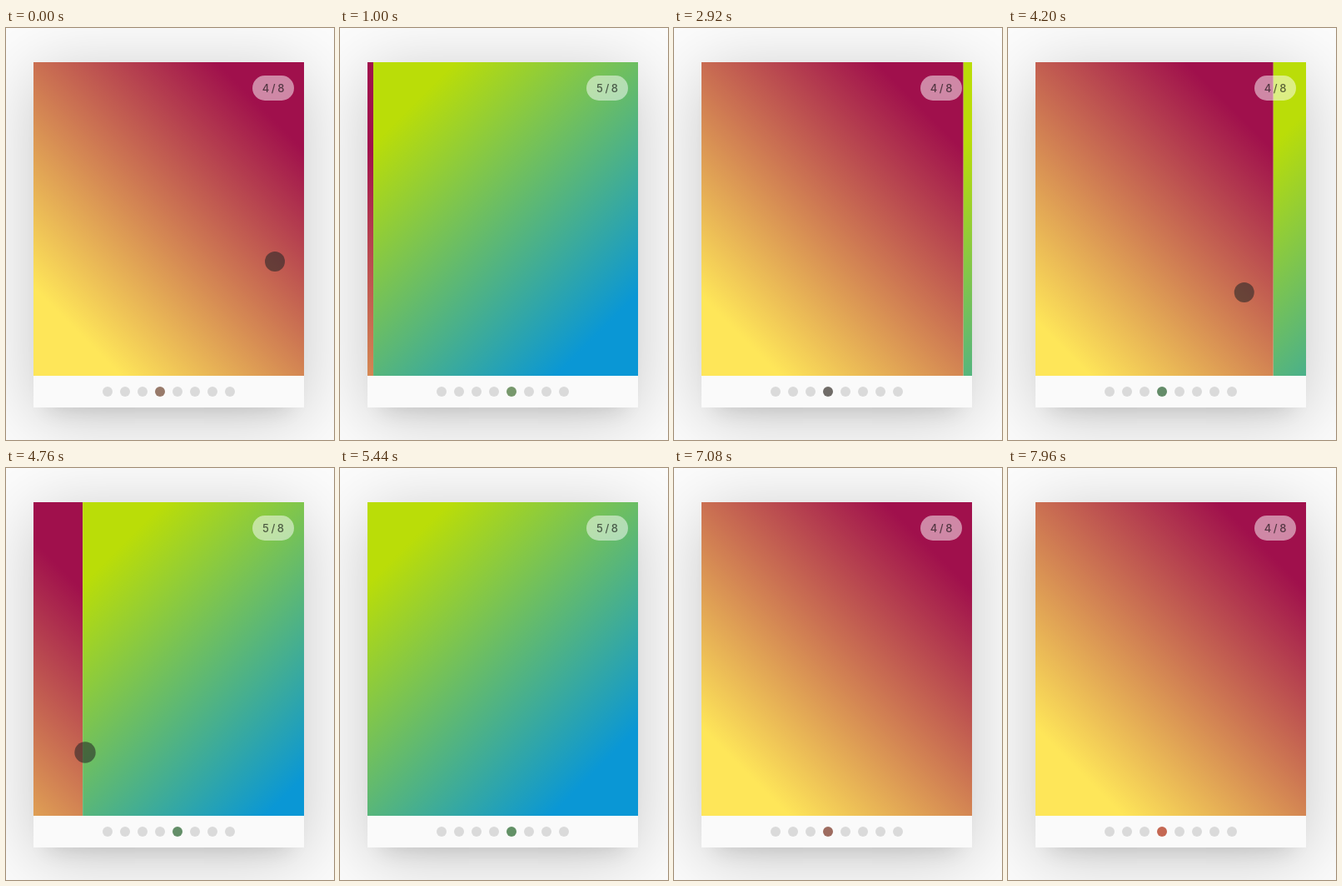
An HTML page for the animation above (8000 ms loop, 394 px wide and 494 px high).

```html
<!DOCTYPE html>
<html lang="en">
<head>
<meta charset="utf-8">
<title>Swipe gallery</title>
<style>
  html, body { margin: 0; width: 100%; height: 100%; overflow: hidden; background: #fcfcfc; }
  .card {
    position: absolute; left: 33px; top: 41px; width: 325px; height: 414px; background: #fafafa;
    box-shadow: 0 12px 80px rgba(0, 0, 0, .21), 0 20px 24px -18px rgba(0, 0, 0, .12);
  }
  .view { position: relative; width: 325px; height: 376px; overflow: hidden; }
  .track { display: flex; width: 650px; height: 100%; }
  .slide { width: 325px; }
  .warm { background: linear-gradient(45deg, #fee659 15%, #a0104c 85%); }
  .cool { background: linear-gradient(135deg, #badd08 14%, #0a97d5 85%); }
  .count {
    position: absolute; left: 263px; top: 16px; width: 50px; height: 30px; border-radius: 15px;
    background: rgba(255, 255, 255, .5); color: rgba(0, 0, 0, .6);
    font: 500 13px/30px Inter, sans-serif; letter-spacing: 2.6px; text-indent: 2.6px; text-align: center;
  }
  .dots { position: absolute; left: 83px; top: 389px; display: flex; gap: 9px; }
  .dots i { width: 12px; height: 12px; border-radius: 50%; background: #dadada; }
  .touch {
    position: absolute; left: -12px; top: -12px; width: 24px; height: 24px; border-radius: 50%;
    background: rgba(40, 40, 40, .6);
  }
</style>
</head>
<body>
<div class="card">
  <div class="view">
    <div class="track"><div class="slide warm"></div><div class="slide cool"></div></div>
    <div class="count"></div>
  </div>
  <div class="dots"><i></i><i></i><i></i><i></i><i></i><i></i><i></i><i></i></div>
</div>
<div class="touch"></div>
<script>
const LOOP = 8000, WIDTH = 325, HOLD = 120, SETTLE = 500, FADE = 260;
const find = s => document.querySelector(s);
const track = find('.track'), count = find('.count'), touch = find('.touch');
const dots = [...document.querySelectorAll('.dots i')];

// press and release times, then the finger's path
const swipes = [
  { press: 0, release: 700, from: [323, 280], to: [110, 305] },
  { press: 1840, release: 2640, from: [138, 288], to: [340, 318] },
  { press: 3880, release: 4685, from: [323, 312], to: [95, 341] },
  { press: 5500, release: 6090, from: [110, 312], to: [360, 337] }
];

// time and colour of the active dot
const tints = [
  [0, 152, 122, 106], [1920, 88, 180, 110], [2920, 112, 108, 104], [4200, 100, 140, 105],
  [5440, 98, 145, 102], [6240, 120, 112, 110], [7960, 198, 104, 82], [8000, 152, 122, 106]
];

const clamp = v => Math.min(1, Math.max(0, v));
const mix = (a, b, p) => a + (b - a) * p;
const easeInOut = p => p < .5 ? 2 * p * p : 1 - 2 * (1 - p) ** 2;
const easeOut = p => 1 - (1 - p) ** 3;

function tintAt(t) {
  const i = tints.findIndex(k => k[0] > t);
  const a = tints[i - 1], b = tints[i], p = (t - a[0]) / (b[0] - a[0]);
  return `rgb(${[1, 2, 3].map(c => Math.round(mix(a[c], b[c], p)))})`;
}

function draw(t) {
  const s = swipes.findLast(w => w.press <= t);
  const drag = easeInOut(clamp((t - s.press - HOLD) / (s.release - s.press - HOLD)));
  const [x, y] = s.from.map((v, i) => mix(v, s.to[i], drag));
  const after = t - s.release;

  const left = s.to[0] < s.from[0];
  const start = left ? 0 : WIDTH;
  const pulled = start + s.from[0] - x;
  const offset = mix(pulled, WIDTH - start, easeOut(clamp(after / SETTLE)));
  track.style.transform = `translateX(${-offset}px)`;

  const active = offset > WIDTH / 2 ? 4 : 3;
  count.textContent = `${active + 1}/8`;
  dots.forEach((d, i) => d.style.background = i === active ? tintAt(t) : '');

  const fade = clamp(after / FADE);
  touch.style.opacity = 1 - fade ** 3;
  touch.style.transform = `translate(${x}px, ${y}px) scale(${1 + .2 * fade})`;
}

const begin = performance.now();
function tick() {
  draw((performance.now() - begin) % LOOP);
  requestAnimationFrame(tick);
}
tick();
</script>
</body>
</html>
```
